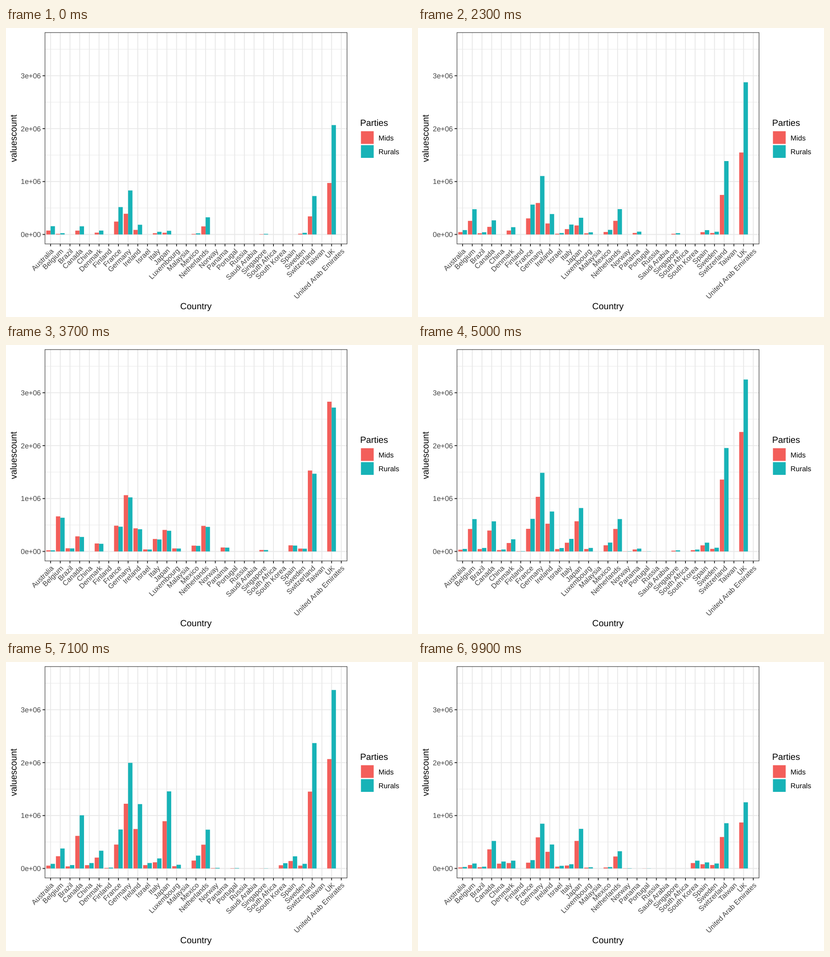
Write an HTML page that moves like this. It is 885 by 632 pixels and loops after 10000 ms.

```html
<!DOCTYPE html>
<html lang="en">
<head>
<meta charset="utf-8">
<title>Values by country and party</title>
<style>
html, body { margin: 0; width: 100%; height: 100%; overflow: hidden; background: #fff; }
svg {
  display: block; width: 885px; height: 632px;
  font-family: "Liberation Sans", Arial, Helvetica, sans-serif;
  text-rendering: geometricPrecision;
}
.title { font-size: 19.5px; fill: #000; }
.label { font-size: 15.6px; fill: #000; }
.axis { font-size: 15.6px; fill: #444; }
.major { stroke: #e8e8e8; stroke-width: 1.9; }
.minor { stroke: #e8e8e8; stroke-width: 0.95; }
.tick { stroke: #2b2b2b; stroke-width: 1.9; }
.border { fill: none; stroke: #2b2b2b; stroke-width: 1.1; }
</style>
</head>
<body>
<svg id="chart" viewBox="0 0 885 632"></svg>
<script>
const svg = document.getElementById("chart");
const COLORS = ["#f35e5a", "#17b3b7"];
const PARTIES = ["Mids", "Rurals"];
const STEP_MS = 100, STEPS = 100;
const PANEL = { left: 85, right: 743.4, top: 10, bottom: 472.2 };
const BASE = 451.5, PX_PER_K = 0.11571;
const BAR = 9.5;

// Each country's total passes through four key values; the power bends each leg.
const TOTAL_STEPS = [0, 37, 71, 99];
const TOTAL_POWERS = [1.25, 1, 1.7];

// The second party's share of every total.
const SHARE_STEPS = [0, 23, 37, 50, 71, 86, 99];
const SHARES = [0.68, 0.65, 0.49, 0.59, 0.62, 0.55, 0.59];

const countries = [];
const country = (name, ...totals) => countries.push({ name, totals });
const yOf = k => BASE - k * PX_PER_K;
const xOf = i => 97.2 + 21.12 * i;

// Totals in thousands at the four key steps.
country("Australia", 230, 44, 141, 48);
country("Belgium", 36, 1301, 609, 159);
country("Brazil", 0, 118, 103, 57);
country("Canada", 227, 560, 1620, 881);
country("China", 0, 0, 165, 222);
country("Denmark", 108, 296, 541, 250);
country("Finland", 0, 0, 27, 0);
country("France", 761, 955, 1188, 267);
country("Germany", 1223, 2086, 3219, 1434);
country("Ireland", 270, 857, 1962, 767);
country("Israel", 0, 75, 166, 85);
country("Italy", 74, 462, 306, 135);
country("Japan", 102, 798, 2350, 1269);
country("Luxembourg", 0, 113, 113, 39);
country("Malaysia");
country("Mexico", 31, 217, 392, 45);
country("Netherlands", 477, 948, 1183, 552);
country("Norway", 0, 0, 18, 8);
country("Panama", 0, 148, 0, 0);
country("Portugal", 0, 0, 12, 4);
country("Russia");
country("Saudi Arabia");
country("Singapore", 17, 55, 5, 0);
country("South Africa");
country("South Korea", 0, 0, 160, 250);
country("Spain", 0, 227, 370, 194);
country("Sweden", 46, 107, 141, 159);
country("Switzerland", 1068, 2999, 3822, 1450);
country("Taiwan");
country("UK", 3040, 5550, 5440, 2120);
country("United Arab Emirates");

function add(tag, attrs, text) {
  const node = document.createElementNS("http://www.w3.org/2000/svg", tag);
  for (const key in attrs) node.setAttribute(key, attrs[key]);
  if (text) node.textContent = text;
  return svg.appendChild(node);
}
const line = (cls, x1, y1, x2, y2) => add("line", { class: cls, x1, y1, x2, y2 });

function interpolate(steps, values, step, powers = []) {
  let i = 0;
  while (i < steps.length - 2 && step >= steps[i + 1]) i++;
  const p = (step - steps[i]) / (steps[i + 1] - steps[i]);
  return values[i] + (values[i + 1] - values[i]) * p ** (powers[i] || 1);
}

function drawGrid() {
  for (let k = 500; k <= 3500; k += 1000) line("minor", PANEL.left, yOf(k), PANEL.right, yOf(k));
  for (let k = 0; k <= 3000; k += 1000) line("major", PANEL.left, yOf(k), PANEL.right, yOf(k));
  countries.forEach((c, i) => line("major", xOf(i), PANEL.top, xOf(i), PANEL.bottom));
}

function drawBars() {
  const bars = [];
  countries.forEach(({ totals }, i) => {
    if (!totals.length) return;
    COLORS.forEach((fill, side) => {
      const rect = add("rect", { x: xOf(i) + (side - 1) * BAR, width: BAR, fill });
      bars.push({ rect, totals, side });
    });
  });
  return bars;
}

function drawAxes() {
  add("rect", {
    class: "border", x: PANEL.left, y: PANEL.top,
    width: PANEL.right - PANEL.left, height: PANEL.bottom - PANEL.top
  });
  for (let m = 0; m <= 3; m++) {
    const y = yOf(m * 1000);
    line("tick", PANEL.left - 5.3, y, PANEL.left, y);
    add("text", { class: "axis", x: 76, y: y + 5.6, "text-anchor": "end" }, m + (m ? "e+06" : "e+00"));
  }
  countries.forEach((c, i) => {
    const x = xOf(i);
    line("tick", x, PANEL.bottom, x, PANEL.bottom + 5.2);
    add("text", {
      class: "axis", "text-anchor": "end",
      transform: `translate(${x + 7.6} 489.2) rotate(-45)`
    }, c.name);
  });
  add("text", { class: "title", x: 414, y: 615, "text-anchor": "middle" }, "Country");
  add("text", { class: "title", transform: "translate(23 241.3) rotate(-90)", "text-anchor": "middle" }, "valuescount");
}

function drawLegend() {
  add("text", { class: "title", x: 772, y: 213.5 }, "Parties");
  PARTIES.forEach((name, i) => {
    const y = 225.7 + 30.5 * i;
    add("rect", { x: 773.7, y, width: 27.8, height: 27.8, fill: COLORS[i] });
    add("text", { class: "label", x: 812, y: y + 20 }, name);
  });
}

drawGrid();
const bars = drawBars();
drawAxes();
drawLegend();

function render(ms) {
  const step = Math.floor(ms / STEP_MS) % STEPS;
  const share = interpolate(SHARE_STEPS, SHARES, step);
  for (const { rect, totals, side } of bars) {
    const total = interpolate(TOTAL_STEPS, totals, step, TOTAL_POWERS);
    const height = total * (side ? share : 1 - share) * PX_PER_K;
    rect.setAttribute("y", BASE - height);
    rect.setAttribute("height", height);
  }
}

const start = performance.now();
function loop() {
  render(performance.now() - start);
  requestAnimationFrame(loop);
}
loop();
</script>
</body>
</html>
```
